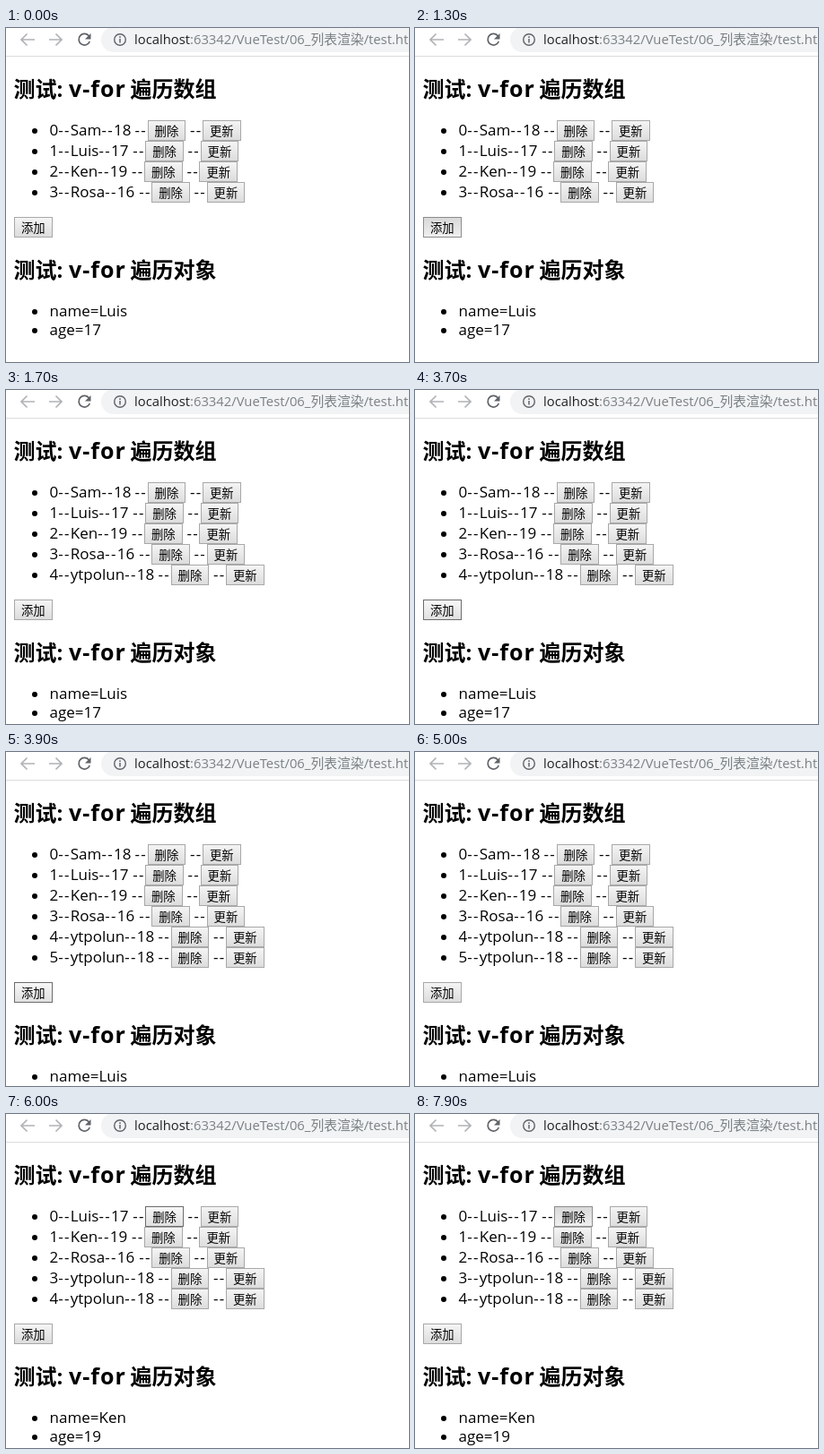
An HTML page for the animation above (8 s loop, 449x373 px).

```html
<!DOCTYPE html>
<html lang="zh">
<head>
<meta charset="utf-8">
<style>
html, body { margin: 0; width: 100%; height: 100%; overflow: hidden; background: #fff; }
svg { display: block; font: 17px "Open Sans", "Noto Sans CJK SC", sans-serif; white-space: pre; }
.heading { font-weight: 700; font-size: 24px; }
.latin { font-size: 25px; letter-spacing: 1px; }
.dash { letter-spacing: 1.3px; }
.url { font-size: 14.8px; fill: #7b8085; }
.btn { font-size: 13.33px; }
.icon { fill: none; stroke: #5f6368; stroke-width: 1.7; }
.off { stroke: #b0b3b6; }
</style>
</head>
<body>
<svg width="449" height="373" viewBox="0 0 449 373">
  <defs>
    <linearGradient id="normal" x2="0" y2="1"><stop stop-color="#f5f5f5"/><stop offset="1" stop-color="#dcdcdc"/></linearGradient>
    <linearGradient id="hover" x2="0" y2="1"><stop stop-color="#f8f8f8"/><stop offset="1" stop-color="#e0e0e0"/></linearGradient>
    <linearGradient id="press" x2="0" y2="1"><stop stop-color="#d8d8d8"/><stop offset="1" stop-color="#f0f0f0"/></linearGradient>
  </defs>
  <rect x="106" y="-1" width="400" height="28" rx="14" fill="#f1f3f4"/>
  <path d="M0 31.5H449" stroke="#dcdcdc"/>
  <path class="icon off" d="M32 13H17M23.5 6.5L17 13l6.5 6.5M48 13h14M55.5 6.5L62 13l-6.5 6.5"/>
  <path class="icon" d="M92.5 9A6.3 6.3 0 1 0 93.3 15"/>
  <path d="M94.5 6v6.500H88z" fill="#5f6368"/>
  <circle class="icon" cx="127" cy="13" r="6.3" style="stroke-width:1.4"/>
  <path d="M127 12v4.500M127 9.300v1.600" stroke="#5f6368" stroke-width="1.5"/>
  <text class="url" x="143" y="18"><tspan fill="#202124">localhost</tspan>:63342/VueTest/06_列表渲染/test.html</text>
  <g id="page"></g>
</svg>
<script>
const page = document.getElementById('page');
// x is where the row's first button starts
const person = (name, age, x) => ({ name, age, x });
const start = [
  person('Sam', 18, 157.6),
  person('Luis', 17, 155.2),
  person('Ken', 19, 154),
  person('Rosa', 16, 162.2)
];
const added = person('ytpolun', 18, 183.6);
const five = [...start, added];
const six = [...five, added];
const last = six.slice(1);

// time, people, button under the pointer, its look
const steps = [
  [0, start],
  [500, start, 'add', 'hover'],
  [1300, start, 'add', 'press'],
  [1400, five, 'add', 'hover'],
  [1700, five],
  [3700, five, 'add', 'hover'],
  [3900, six, 'add', 'hover'],
  [5000, six],
  [5500, six, 1, 'hover'],
  [5600, six, 0, 'hover'],
  [5900, six, 0, 'press'],
  [6000, last, 0, 'hover'],
  [7900, last, 0, 'press']
];
const borders = { normal: '#a8a8a8', hover: '#6c6c6c', press: '#8c8c8c' };
const buttonWidth = 42.67, buttonStep = 61.4;
const dash = '<tspan class="dash">--</tspan>';

const text = (x, y, content) => `<text x="${x}" y="${y}">${content}</text>`;

// Edges snap to whole pixels
function button(x, y, label, look = 'normal') {
  const left = Math.round(x), right = Math.round(x + buttonWidth);
  return `<rect x="${left + .5}" y="${y + .5}" width="${right - left - 1}" height="22" fill="url(#${look})" stroke="${borders[look]}"/>
    <text class="btn" x="${x + 8}" y="${y + 17}">${label}</text>`;
}

const heading = (y, subject) =>
  `<text class="heading" y="${y}"><tspan x="8.5">测试:</tspan><tspan class="latin" x="70">v-for</tspan><tspan x="138.5">遍历${subject}</tspan></text>`;

const item = (y, content) =>
  `<circle cx="32" cy="${y - 5}" r="3"/>` + text(48.5, y, content);

function draw([, people, target, look]) {
  const rows = people.map(({ name, age, x }, i) => {
    const y = 103 + i * 23, next = x + buttonStep;
    return item(y + 17, `${i}${dash}${name}${dash}${age}`)
      + text(x - 14, y + 17, dash)
      + button(x, y, '删除', target === i ? look : 'normal')
      + text(next - 14, y + 17, dash)
      + button(next, y, '更新');
  });
  const bottom = 119 + people.length * 23;
  page.innerHTML = heading(77, '数组') + rows.join('')
    + button(9, bottom, '添加', target === 'add' ? look : 'normal')
    + heading(bottom + 68, '对象')
    + item(bottom + 111, 'name=' + people[1].name)
    + item(bottom + 132, 'age=' + people[1].age);
}

let shown;
function tick() {
  const time = performance.now() % 8000;
  const step = steps.findLast(s => s[0] <= time);
  if (step !== shown) draw(shown = step);
  requestAnimationFrame(tick);
}
tick();
</script>
</body>
</html>
```
